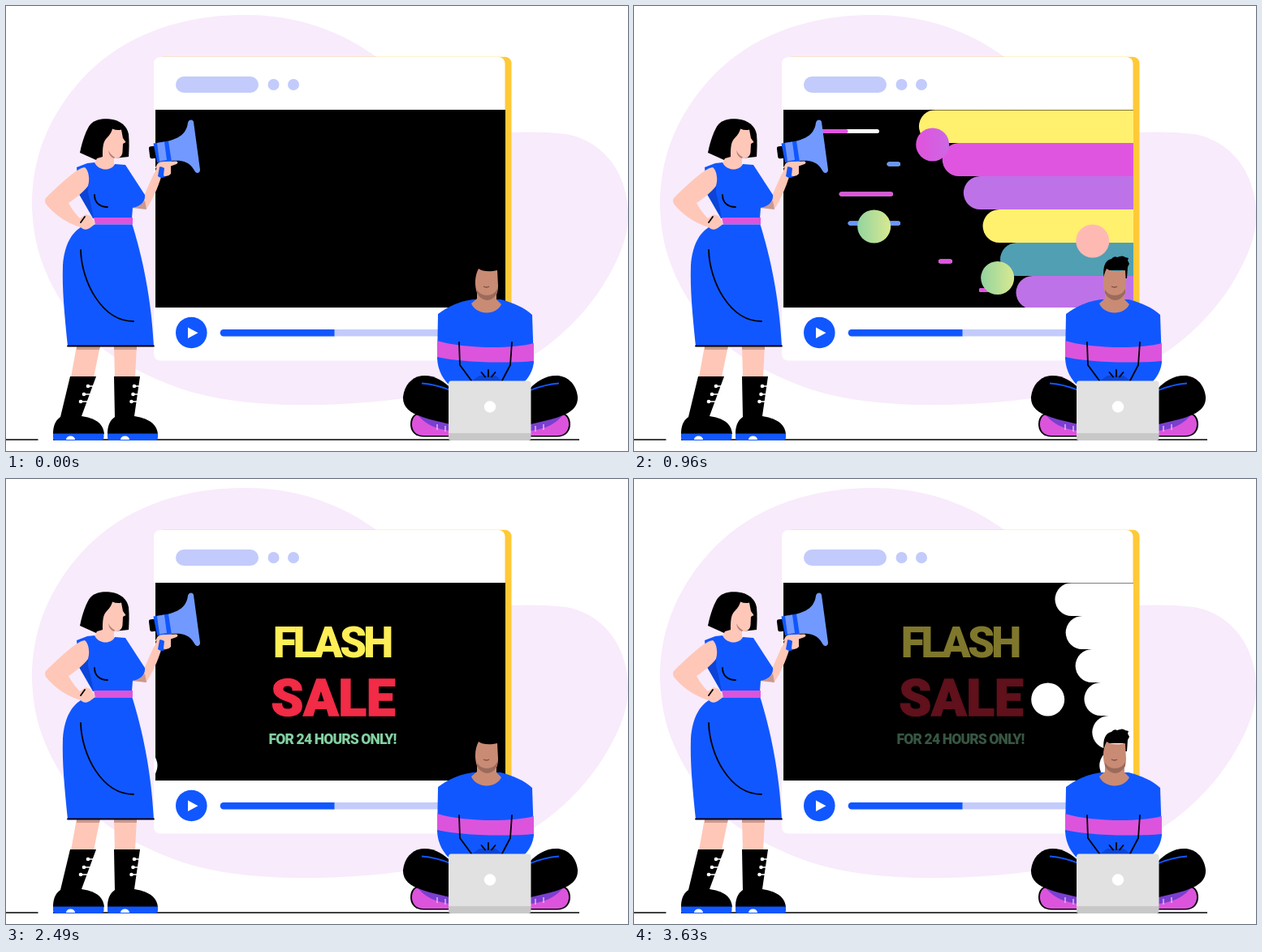
An HTML page for the animation above (3.66 s loop, 766 by 549 pixels).

```html
<!DOCTYPE html>
<html lang="en">
<head>
<meta charset="utf-8">
<title>Flash sale</title>
<style>
html, body { margin: 0; width: 100%; height: 100%; overflow: hidden; background: #fff; }
svg { display: block; width: 766px; height: 549px; }
text { font-family: Roboto, "Open Sans", sans-serif; font-weight: 900; text-anchor: middle; }
.ink { fill: none; stroke: #000; stroke-width: 1.8; stroke-linecap: round; stroke-linejoin: round; }
.lace { fill: none; stroke: #fff; stroke-width: 1.6; }
</style>
</head>
<body>
<svg viewBox="0 0 766 549">
  <defs>
    <clipPath id="screen"><rect x="184" y="128.400" width="431" height="243.600"/></clipPath>
  </defs>

  <path fill="#f8ebfb" d="M455 62C400 22 340 10 290 11C200 12 130 45 85 100C50 143 32 190 32 245C33 300 50 340 82 385C110 425 160 452 215 472C270 490 330 493 385 492C470 490 520 480 560 470C640 450 700 400 735 345C755 312 767 285 766 255C765 200 730 165 690 158C665 155 640 155 623 156Z"/>
  <path d="M0 535H39.500M58 535H706" stroke="#000" stroke-width="1.700"/>

  <!-- player window -->
  <rect x="186" y="62.700" width="436.500" height="374" rx="8" fill="#ffc937"/>
  <rect x="182" y="63" width="432.500" height="374.500" rx="8" fill="#fff"/>
  <g fill="#c2cbfb">
    <rect x="209" y="87" width="102" height="20" rx="10"/>
    <circle cx="329.500" cy="97" r="7"/><circle cx="354" cy="97" r="7"/>
    <rect x="264" y="399" width="290" height="8.500" rx="4"/>
  </g>
  <path fill="#1157ff" d="M268 399H404.500V407.500H268A4.250 4.250 0 0 1 268 399Z"/>
  <circle cx="228.300" cy="403" r="19.300" fill="#1157ff"/>
  <path fill="#fff" d="M224 396.500L236.500 403.300L224 410Z"/>
  <rect x="184" y="128" width="431" height="244"/>
  <g clip-path="url(#screen)">
    <g id="colour"></g>
    <g id="white"></g>
  </g>
  <g id="copy">
    <text x="401" y="219.500" font-size="53" letter-spacing="-4" fill="#ffee56">FLASH</text>
    <text x="403" y="292" font-size="63.500" fill="#f22b46" stroke="#f22b46" stroke-width="1.500">SALE</text>
    <text x="402" y="326.500" font-size="17.500" letter-spacing="-0.850" fill="#83d0a0">FOR 24 HOURS ONLY!</text>
  </g>

  <!-- woman -->
  <g id="woman">
    <path fill="#ffc7b8" d="M87 419H116L108 458H80ZM133 419H161L159 458H134Z"/>
    <path fill="#c9998d" d="M87 420H116L115 424H87ZM133 420H161V424H133Z"/>
    <path d="M79 457H111L93 506C108 508 120 514 121 528H58C58 518 61 511 67 507ZM133 457H165L158 506C172 508 186 514 187 528H125C125 518 128 511 134 507Z"/>
    <path fill="#1157ff" d="M58 527.500H120.500V532Q120.500 536 116 536H62Q58 536 58 532ZM125 527.500H187V532Q187 536 183 536H129Q125 536 125 532Z"/>
    <path fill="#fff" d="M74 535A5.500 4.500 0 0 1 85 535ZM141 535A5.500 4.500 0 0 1 152 535Z"/>
    <path class="lace" d="M101 469H107M96 479H103M92 488H100M158 469H164M156 479H162M154 488H161"/>
    <g fill="#fff">
      <circle cx="101" cy="469" r="2.300"/><circle cx="96" cy="479" r="2.300"/><circle cx="92" cy="488" r="2.300"/>
      <circle cx="158" cy="469" r="2.300"/><circle cx="156.500" cy="479" r="2.300"/><circle cx="154.500" cy="488" r="2.300"/>
    </g>
    <path d="M91 181C94 166 99 152 104 146C111 139 120 139 128 139.500C141 141 149 148 151 158C152 168 151.500 178 151 186L132 188L111 190Z"/>
    <path fill="#ffc7b8" d="M131 151.500Q137 154 142 152.500L144 163L147.500 168L144 170L143.500 180C143 186 139 188.500 133 188V196C132 204 112 204 109 194L112 188L119 186C119 176 119 168 124 163Q130 157 131 151.500Z"/>
    <path fill="#b58478" d="M126 178Q129 184 134 186.500L133 188Q127 186 126 178Z"/>
    <path fill="#ffc7b8" d="M156 248L171 232C177 218 182 207 187 197L200 206L191 211C187 224 181 238 173 250Z"/>
    <path fill="#c9998d" d="M155 249Q165 247 171 240L173 251Z"/>
    <path fill="#1157ff" d="M87 199L100 194L109 193C114 204 130 204 134 195L147 196L171 233C172 242 165 247 156 249L155 262H107L90 232Z"/>
    <path fill="#0b44d6" d="M102 208L101 230Q105 245 108 262L90 232Z"/>
    <path fill="#ffc7b8" d="M93 200C80 206 58 228 49 237Q47 240 49 244C60 258 76 268 92 273Q97 278 103 274L107 271L110 268L104 259L98 257L91 262C86 257 80 249 77 243C86 237 95 230 101 222C104 212 101 202 97 199Z"/>
    <path fill="#dc54dc" d="M108 261H156V269.500H110Z"/>
    <path fill="#1157ff" d="M109 269.500H155.500C168 310 179 360 182 420H76C72 380 69 350 70 320C72 294 81 280 92 273Q97 278 103 274Z"/>
    <path class="ink" d="M76 419.500H182M92 301C93 340 118 389 157 389M109 233C109 243 116 248 125 248M97 260L92 267"/>

    <rect x="176.500" y="173" width="9" height="15" rx="2.500" transform="rotate(-7 181 180)"/>
    <ellipse cx="238" cy="172.500" rx="5.200" ry="4.300"/>
    <path class="ink" d="M249.500 167L255 162.500M249.500 171.500H258.500M249.500 176L255 180.500"/>
    <path fill="#7199ff" d="M199 167C212 163 222 159 224 144C225 139.500 230.500 139.500 231 143L239 202C239 206.500 234 207.500 232 203C226 191 215 190 203 191Z"/>
    <path fill="#1157ff" d="M181.500 169.500L200 166.500L204 192L197 210Q192 214 187 210L190 193H186Z"/>
    <path fill="#7199ff" d="M186 169L195 167.500L198 190L189 191.500Z"/>
    <path fill="#ffc7b8" d="M183 201L187 194Q190 191.500 196 192L210 191.500Q213 193 210 195L203 197.500V207Q200 211 194 209.500L195 200Q190 196 183 201Z"/>
  </g>

  <!-- man -->
  <g id="man">
    <path d="M578.500 334C577 321 581 313 588 312Q591 308 595 310Q602 307 605 310L609 311L608 314L610 318L608 322L607 336H603V326H582Z"/>
    <path fill="#1157ff" d="M532 380C545 370 560 364 575 362H609C625 366 638 372 648 381L650 440C648 455 640 463 630 471H550C538 462 532 450 531 435Z"/>
    <path fill="#c98b74" d="M582 324C587 328 597 328 605 326L606 345C606 350 605 354 604 356V362L610 368C604 382 579 382 573 367L580 361V354C577 345 577 333 582 324Z"/>
    <path fill="#9b6a5b" d="M580 350Q584 357 592 357Q601 357 605 349V354Q600 363 592 363Q584 362 580 354Z"/>
    <path d="M588 346Q592 348 595 346" fill="none" stroke="#7a4c40" stroke-width="1.300"/>
    <path fill="#dc54dc" d="M531 413C560 422 620 424 650 416V438C620 441 560 440 531 433Z"/>
    <path fill="#0b44d6" d="M573 463L583 456H603L612 463Z"/>
    <path class="ink" d="M558 415L559 443L573 462M623 415L621 443L611 462M594 449V457M585.500 452L590 457.500M602.500 452L598 457.500"/>
    <g id="leg">
      <path d="M498 516C498 507 503 502 511 501L547 510V531.500H514C504 531.500 498 525 498 516Z"/>
      <path fill="#dc54dc" d="M500 516C500 508 504 504 510 503L547 514V530H514C505 530 500 524 500 516Z"/>
      <path fill="#7a3fd0" d="M506 503L547 512V524Q519 521 506 503Z"/>
      <path d="M531 516V523M541 518V525" stroke="#d9b8f5" stroke-width="1.500"/>
      <path d="M489 482C491 465 503 456 515 456C530 456 540 464 547 471V516L522 510C505 505 488 499 489 482Z"/>
      <path d="M512 465.500Q530 467 547 474" fill="none" stroke="#1157ff" stroke-width="1.800"/>
    </g>
    <use href="#leg" transform="translate(1193 0) scale(-1 1)"/>
    <path fill="#e1e1e1" d="M548 462.500H643.500Q646.500 462.500 646.500 466V527H545V466Q545 462.500 548 462.500Z"/>
    <path fill="#c8c8c8" d="M545 527H646.500V533Q646.500 536 643.500 536H548Q545 536 545 533Z"/>
    <circle cx="596" cy="494.500" r="7.200" fill="#fff"/>
  </g>
</svg>
<script>
const LOOP = 3660, SECOND_WAVE = 2381, BAR = 864, ROW = 41, LAG = 36.2;
const YELLOW = '#fff06e', PINK = '#df55df', GREEN = '#7ccb9c', BLUE = '#6698ff', VIOLET = '#be72e8';
const clamp = v => Math.max(0, Math.min(1, v));
const svg = document.querySelector('svg');
const defs = svg.querySelector('defs');

function add(parent, tag, attrs) {
  const el = document.createElementNS('http://www.w3.org/2000/svg', tag);
  for (const k in attrs) el.setAttribute(k, attrs[k]);
  parent.append(el);
  return el;
}

function gradient(id, stops) {
  const g = add(defs, 'linearGradient', { id });
  stops.forEach(([offset, color]) => add(g, 'stop', { offset, 'stop-color': color }));
  return `url(#${id})`;
}

const rows = [[YELLOW, GREEN], [PINK, BLUE], [VIOLET, PINK], [YELLOW, GREEN], ['#509fb3', BLUE, GREEN], [VIOLET, '#cb66e3']]
  .map((c, i) => gradient('row' + i, c.map((color, k) => [0.41 + 0.19 * k / (c.length - 1), color])));
const lime = gradient('lime', [[0, '#93d4a0'], [1, '#d9e990']]);
const orchid = gradient('orchid', [[0, '#e052dc'], [1, '#cd68e4']]);

// y, x at 960 ms, speed at 960 ms, fill
const balls = [
  [171, 367, 0.7, orchid], [207, 686, 0.85, orchid], [272, 295, 0.662, lime],
  [290, 564, 0.77, '#ffb9b3'], [335.5, 447, 0.674, lime]
];

// y, x, start, stroke time, fill, length
const dashes = [
  [154.5, 224, 720, 150, PINK], [195, 250, 687, 100, BLUE], [218, 275, 426, 150, PINK],
  [232, 241, 709, 120, PINK], [241, 414, 217, 150, BLUE], [268, 250, 791, 80, BLUE],
  [277.5, 287, 423, 150, BLUE, 48], [283, 469, 337, 150, PINK],
  [315, 314, 554, 149, PINK], [350.5, 364, 554, 149, PINK]
];

// left end of a bar: speeds up, then glides to a stop
function glide(t) {
  const s = t - 600;
  return s < 0 ? -160 + 2.2 * s + 0.0017 * s * s : 660 - 820 * Math.exp(-s / 370);
}

function span(el, a, b) {
  const on = b - a > 0.5;
  el.setAttribute('visibility', on ? 'inherit' : 'hidden');
  if (on) {
    el.setAttribute('x', a);
    el.setAttribute('width', b - a);
  }
}

function makeWave(id, plain) {
  const root = document.getElementById(id);
  const paint = c => plain ? '#fff' : c;
  const bars = rows.map((c, i) => add(root, 'rect', {
    y: 128 + ROW * i, width: BAR, height: ROW, rx: ROW / 2, fill: paint(c)
  }));
  const strips = dashes.map(([y, , , , c]) => ['#fff', paint(c)].map(fill =>
    add(root, 'rect', { y: y - 2.5, height: 5, rx: 2.5, fill })));
  const discs = balls.map(([cy, , , c]) => add(root, 'circle', { cy, r: 20.5, fill: paint(c) }));

  return t => {
    root.setAttribute('visibility', t < 90 ? 'hidden' : 'visible');
    if (t < 90) return;
    bars.forEach((b, i) => b.setAttribute('x', glide(t + LAG * i)));
    const s = t - 960;
    discs.forEach((d, i) => d.setAttribute('cx', balls[i][1] + balls[i][2] * s + 0.00027 * s * s));
    strips.forEach(([under, over], i) => {
      const [, x, start, time, , len = 78] = dashes[i];
      const u = (t - start) / time;
      const at = lag => x + len * clamp(u - lag);
      span(under, at(1.95), at(0));
      span(over, at(1.95), at(1.1));
    });
  };
}

const waves = [makeWave('colour', false), makeWave('white', true)];
const lines = [...document.querySelectorAll('#copy text')];
const fadeIn = [1330, 1630, 1930], fadeOut = [3430, 3390, 3397];

function draw(t) {
  waves[0](t);
  waves[1](t - SECOND_WAVE);
  lines.forEach((el, i) => {
    const shown = clamp((t - fadeIn[i]) / 400);
    el.setAttribute('opacity', shown * (1 - clamp((t - fadeOut[i]) / 400)));
    el.setAttribute('transform', `translate(0 ${3 * (1 - shown)})`);
  });
}

const begin = performance.now();
function tick() {
  draw((performance.now() - begin) % LOOP);
  requestAnimationFrame(tick);
}
draw(0);
requestAnimationFrame(tick);
</script>
</body>
</html>
```
